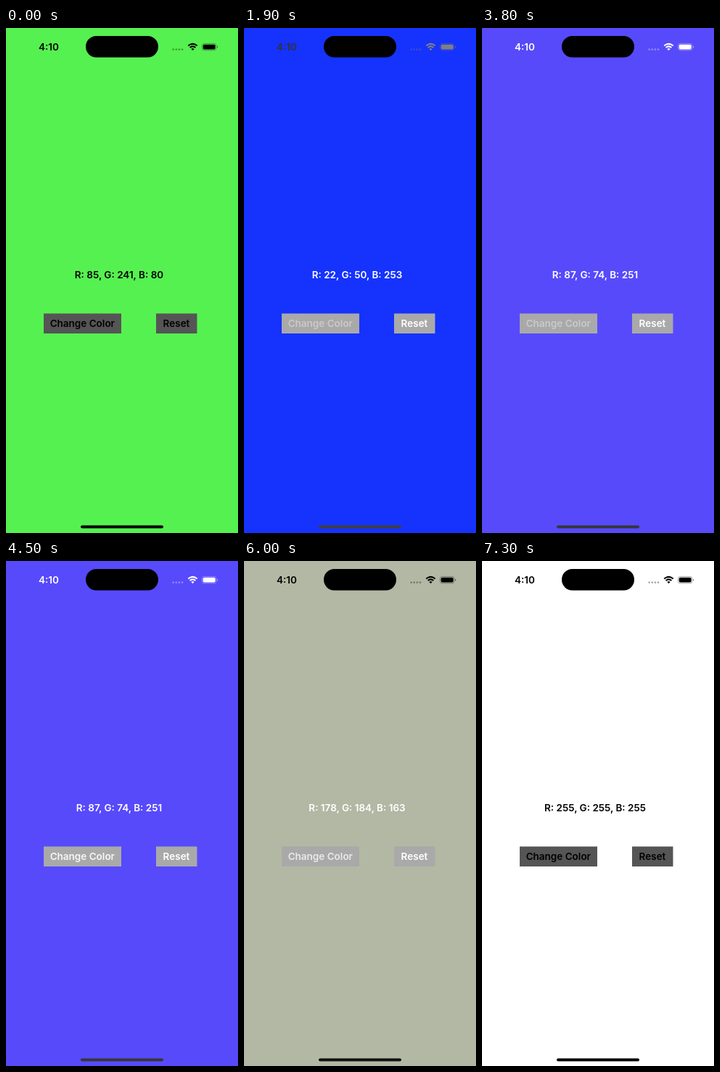
These frames come from a looping animation (320x696 px, 8000 ms). An HTML page:

```html
<!DOCTYPE html>
<html lang="en">
<head>
<meta charset="utf-8">
<title>Random colours</title>
<style>
  html, body { margin: 0; width: 100%; height: 100%; overflow: hidden; }
  svg { display: block; width: 320px; height: 696px; }
  text { font: 600 13.5px Inter, sans-serif; text-anchor: middle; }
</style>
</head>
<body>
<svg viewBox="0 0 320 696">
  <rect id="bg" width="320" height="696"/>
  <rect x="110" y="11" width="100" height="29.5" rx="14.7"/>
  <text id="clock" x="59" y="31">4:10</text>
  <g id="icons">
    <g opacity=".35">
      <circle cx="230.7" cy="29.6" r="1.3"/><circle cx="234.8" cy="29.6" r="1.3"/>
      <circle cx="238.9" cy="29.6" r="1.3"/><circle cx="243" cy="29.6" r="1.3"/>
    </g>
    <g id="waves" fill="none" stroke-width="2">
      <path d="M251.3 24.6Q257.5 19.2 263.7 24.6"/>
      <path d="M253.6 27.1Q257.5 23.7 261.4 27.1"/>
    </g>
    <path d="M255.4 28.9Q257.5 27.2 259.6 28.9L257.5 31Z"/>
    <rect id="shell" x="270.4" y="21.4" width="19.6" height="9.4" rx="3" fill="none" stroke-width=".8" opacity=".4"/>
    <rect x="271.7" y="22.7" width="17" height="6.8" rx="1.9"/>
    <path d="M291 24.6q1.3 .5 1.3 1.5t-1.3 1.5z" opacity=".45"/>
  </g>
  <text id="label" x="156" y="344.6"></text>
  <g id="plates">
    <rect x="52" y="393.5" width="107" height="27.5"/>
    <rect x="207" y="393.5" width="56.5" height="27.5"/>
  </g>
  <g id="words">
    <text id="change" x="105.3" y="412.4">Change Color</text>
    <text id="reset" x="235" y="412.4">Reset</text>
  </g>
  <rect id="home" x="103" y="685.6" width="114" height="4" rx="2"/>
</svg>
<script>
const LOOP = 8000, STEP = 100;
const $ = id => document.getElementById(id);

// start time, colour, white lettering, white status bar, home bar grey
const states = [
  [0,    [85, 241, 80],   0, 0, 0],
  [1900, [22, 50, 253],   1, 1, 62],
  [2900, [167, 11, 93],   1, 1, 72],
  [3800, [87, 74, 251],   1, 1, 54],
  [4800, [102, 240, 5],   0, 0, 0],
  [5900, [178, 184, 163], 1, 0, 16],
  [6800, [255, 255, 255], 0, 0, 0]
];
const taps = [1300, 1900, 2400, 2900, 3350, 3800, 4300, 4800, 5350, 5900];
const resets = [6800];

const grey = v => `rgb(${v},${v},${v})`;

// A pressed title drops to low opacity and eases back.
function titleOpacity(presses, t) {
  const last = presses.filter(p => p <= t).pop();
  const age = t - last;
  return last === undefined || age > 550 ? 1 : 1 - 0.62 * Math.exp(-age / 110);
}

function draw(t) {
  const i = states.filter(s => s[0] <= t).length - 1;
  const [start, rgb, light, statusLight, homeGrey] = states[i];
  const before = i ? states[i - 1][3] : statusLight;
  const k = Math.min(1, (t - start) / 300);
  const status = (from, power) => {
    const p = from + (1 - from) * k;
    return grey(Math.round(255 * (before + (statusLight - before) * p) ** power));
  };
  // Only the first darkening of the page cross-fades the status bar.
  const fades = statusLight > before;
  const ink = grey(light * 255);
  const icons = fades ? status(.5, 1) : grey(statusLight * 255);

  $("bg").setAttribute("fill", `rgb(${rgb})`);
  $("label").textContent = ["R", "G", "B"].map((c, n) => `${c}: ${rgb[n]}`).join(", ");
  $("label").setAttribute("fill", ink);
  $("words").setAttribute("fill", ink);
  $("plates").setAttribute("fill", grey(light ? 169 : 85));
  $("clock").setAttribute("fill", fades ? status(.2, 1) : grey(statusLight * 255));
  $("icons").setAttribute("fill", icons);
  $("waves").setAttribute("stroke", icons);
  $("shell").setAttribute("stroke", icons);
  $("home").setAttribute("fill", grey(homeGrey));
  $("change").setAttribute("opacity", titleOpacity(taps, t));
  $("reset").setAttribute("opacity", titleOpacity(resets, t));
}

const begin = performance.now();
function tick() {
  const t = (performance.now() - begin) % LOOP;
  draw(Math.floor(t / STEP) * STEP);
  requestAnimationFrame(tick);
}
tick();
</script>
</body>
</html>
```
